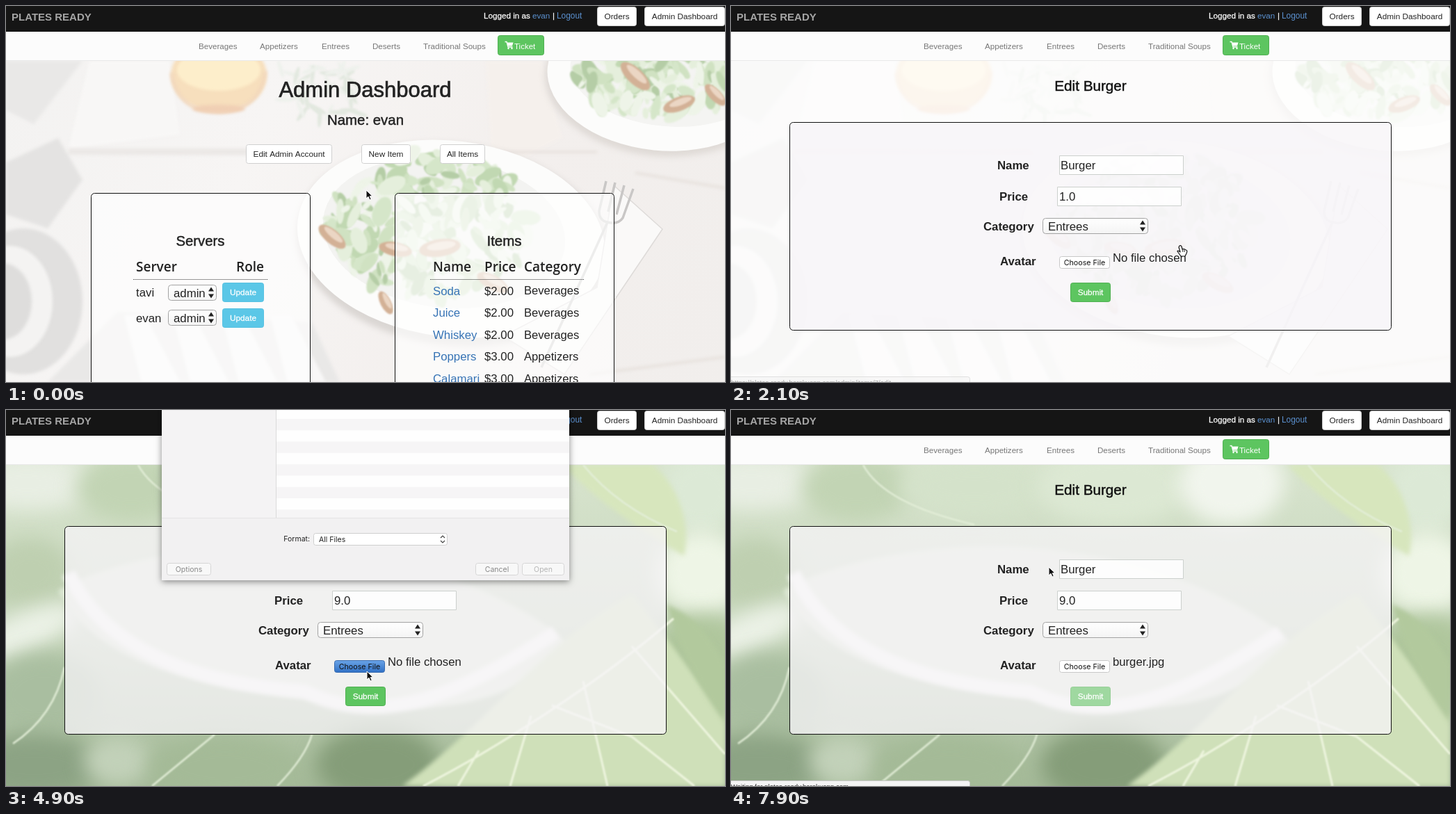
Write an HTML page with a canvas that moves like this. It is 1034 px wide and 541 px high and loops after 8 s.

```html
<!DOCTYPE html>
<html lang="en">
<head>
<meta charset="utf-8">
<title>Admin dashboard</title>
<style>
html, body { margin: 0; width: 100%; height: 100%; overflow: hidden; background: #fff; }
canvas { display: block; }
</style>
</head>
<body>
<canvas id="stage" width="1034" height="541"></canvas>
<script>
const W = 1034, H = 541, LOOP = 8000, STEP = 100;
const stage = document.getElementById('stage').getContext('2d');
let c = stage;

const SANS = '"Liberation Sans", Arial, sans-serif';
const HEAD = '"Open Sans", sans-serif';
const UI = 'Inter, sans-serif';
const INK = '#222', LINK = '#3673b5', GREEN = '#5dc560';

const clamp = v => Math.max(0, Math.min(1, v));
const span = (t, a, b) => clamp((t - a) / (b - a));
const easeOut = p => 1 - (1 - p) ** 2;
const smooth = p => p * p * (3 - 2 * p);
const lerp = (a, b, p) => a + (b - a) * p;

function randomizer(seed) {
  return () => (seed = (seed * 16807) % 2147483647) / 2147483647;
}

// y is the vertical centre of the capitals
function text(s, x, y, size, color = INK, o = {}) {
  c.font = `${o.weight || 400} ${size}px ${o.font || SANS}`;
  c.textAlign = o.align || 'left';
  c.fillStyle = c.strokeStyle = color;
  c.fillText(s, x, y + size * 0.36);
  if (o.medium) {
    c.lineWidth = size * 0.022;
    c.strokeText(s, x, y + size * 0.36);
  }
}

function rect(x, y, w, h, color) {
  c.fillStyle = color;
  c.fillRect(x, y, w, h);
}

function box(x, y, w, h, r, fill, border) {
  c.beginPath();
  c.roundRect(x + 0.5, y + 0.5, w - 1, h - 1, r);
  if (fill) { c.fillStyle = fill; c.fill(); }
  if (border) { c.strokeStyle = border; c.lineWidth = 1; c.stroke(); }
}

function path(points, fill, stroke, width = 1) {
  c.beginPath();
  points.forEach(([x, y]) => c.lineTo(x, y));
  if (fill) { c.closePath(); c.fillStyle = fill; c.fill(); }
  if (stroke) { c.strokeStyle = stroke; c.lineWidth = width; c.stroke(); }
}

function blob(x, y, rx, ry, color, angle = 0) {
  c.beginPath();
  c.ellipse(x, y, rx, ry, angle, 0, 7);
  c.fillStyle = color;
  c.fill();
}

function curve(d, fill, stroke, width) {
  const p = new Path2D(d);
  if (fill) { c.fillStyle = fill; c.fill(p); }
  if (stroke) { c.strokeStyle = stroke; c.lineWidth = width; c.stroke(p); }
}

function gradient(x0, y0, x1, y1, ...colors) {
  const g = c.createLinearGradient(x0, y0, x1, y1);
  colors.forEach((color, i) => g.addColorStop(i / (colors.length - 1), color));
  return g;
}

function blurred(px, draw) {
  c.filter = `blur(${px}px)`;
  draw();
  c.filter = 'none';
}

function layer(draw) {
  const canvas = document.createElement('canvas');
  canvas.width = W;
  canvas.height = H;
  c = canvas.getContext('2d');
  draw();
  c = stage;
  return canvas;
}

function salad(cx, cy, rx, ry, count, seed) {
  const rnd = randomizer(seed);
  const greens = ['#d5e6c9', '#c1d8b2', '#e5efdc', '#b5cda6', '#eef4e8', '#d0e2c2'];
  for (let i = 0; i < count; i++) {
    const a = rnd() * 6.283, d = Math.sqrt(rnd()), size = 7 + rnd() * 15;
    blob(cx + Math.cos(a) * d * rx, cy + Math.sin(a) * d * ry,
      size, size * (0.3 + rnd() * 0.3), greens[Math.floor(rnd() * 6)], rnd() * 3);
  }
}

function shrimp(x, y, size, angle) {
  blob(x, y, size, size * 0.42, '#d3b196', angle);
  blob(x + 2, y - 3, size * 0.7, size * 0.2, '#ebd6c4', angle);
}

const tablePhoto = layer(() => {
  rect(0, 0, W, H, gradient(0, 79, W, H, '#f3f2f1', '#f7f5f4', '#f3efed', '#f1eeec'));
  blurred(2, () => {
    path([[0, 79], [110, 79], [40, 170], [0, 150]], '#e9e8e7');
    path([[120, 79], [235, 79], [250, 185], [90, 205]], '#f8f7f6');
    path([[90, 205], [430, 205], [440, 215], [90, 214]], '#ebe8e6');
    path([[0, 225], [75, 190], [110, 250], [60, 320], [0, 300]], '#e4e3e2');
    blob(25, 425, 85, 105, '#e1e0df');
    blob(5, 425, 62, 80, '#f4f3f2');
    blob(-5, 425, 42, 55, '#dedddc');
    path([[60, 541], [160, 440], [440, 455], [480, 541]], '#e9e8e7');
    for (let i = 0; i < 4; i++)
      path([[170 + i * 70, 445], [200 + i * 70, 445], [250 + i * 70, 541], [195 + i * 70, 541]], '#f8f7f7');
    path([[690, 79], [770, 79], [800, 190], [700, 240]], '#f5f0ec');
    curve('M700 210H850M905 240L1034 262M840 530L1034 505', null, '#e5dfda', 3);

    blob(306, 100, 69, 52, '#f7dfbd');
    blob(306, 92, 60, 30, '#fdeecb');
    curve('M238 96Q246 152 306 153Q366 150 373 94', null, '#f1d6bb', 4);
    blob(306, 148, 38, 6, '#f0cfb4');
  });
  blurred(1.5, () => {
    const rnd = randomizer(31);
    for (let i = 0; i < 45; i++)
      blob(395 + rnd() * 115, 85 + rnd() * 78, 13, 3, i % 2 ? '#e2e8df' : '#eef1ec', rnd() * 3);
  });
  blurred(4, () => {
    blob(940, 110, 166, 106, '#dfdad6', 0.1);
    blob(642, 343, 226, 145, '#dad6d3', 0.12);
  });
  blob(942, 104, 164, 104, '#fcfcfb', 0.1);
  blob(950, 97, 139, 76, '#f4f4f2', 0.1);
  blob(640, 335, 222, 141, '#fcfcfb', 0.12);
  blob(630, 326, 175, 108, '#f3f3f1', 0.12);

  blurred(0.8, () => {
    salad(940, 108, 130, 50, 150, 71);
    shrimp(905, 101, 27, 0.75);
    shrimp(968, 141, 24, -0.35);
    shrimp(1020, 128, 20, 0.8);
    salad(611, 315, 143, 103, 270, 19);
    shrimp(469, 332, 24, 0.7);
    shrimp(546, 427, 18, 1.1);
    shrimp(624, 348, 30, -0.15);
    shrimp(700, 398, 25, 0.5);
    shrimp(560, 350, 24, 0.2);
  });
  path([[874, 258], [944, 321], [803, 530], [715, 475], [850, 405]], '#faf9f8', '#dedbd9', 1.5);
  curve('M863 252L853 295Q853 309 865 311M876 254L866 296M889 258L878 300M902 263L887 305Q880 315 865 311L770 520', null, '#c9c7c6', 3.5);
});

const leafPhoto = layer(() => {
  rect(0, 0, W, H, gradient(0, 79, 0, H, '#d8e4ce', '#c6d6bb', '#a5ba99'));
  blurred(14, () => {
    blob(30, 105, 110, 38, '#e8eee3');
    blob(180, 112, 80, 50, '#c2d4b4');
    blob(350, 110, 110, 42, '#d4e2ca');
    blob(550, 110, 110, 55, '#dce8d3');
    blob(720, 105, 75, 60, '#f1f5ed');
    blob(35, 235, 60, 50, '#becfb0');
    blob(25, 320, 85, 28, '#ebf1e6', -0.4);
    blob(55, 410, 80, 60, '#a9bea0');
    blob(40, 512, 100, 46, '#8ca384');
    blob(160, 505, 48, 35, '#c2d1b9');
    blob(315, 515, 110, 48, '#a4ba97');
    blob(535, 510, 90, 55, '#859d79');
    blob(1000, 120, 60, 60, '#dce9d6');
    blob(1000, 235, 65, 60, '#eef5e6');
    blob(1000, 360, 75, 65, '#afc69c');
  });
  blurred(3, () => {
    curve('M75 260C160 210 340 180 490 205C620 220 770 290 810 340C740 420 620 440 500 425C330 400 145 390 75 260Z', '#dfe9d6');
    curve('M90 235C150 360 300 395 430 405C530 455 640 420 790 320', null, '#f7faf4', 20);
    curve('M800 79C850 130 900 165 975 210C985 170 970 110 930 79Z', '#d7e6bd');
    curve('M570 541C690 455 770 335 900 265C945 320 1010 410 1034 440V541Z', '#cfe0b9');
    curve('M950 280C1000 300 1020 340 1034 365V450C1000 405 970 350 950 280Z', '#b2c99d');
  });
  blurred(1, () => {
    curve('M600 541C700 490 850 395 960 300M680 490L650 541M755 440L725 541M830 390L865 541M900 340L1034 495M785 425L900 470L990 541', null, '#eef5df', 3);
    curve('M830 79Q880 140 965 175M190 79Q220 135 350 165M10 480Q70 440 84 370M210 541L300 467M390 541Q430 500 440 467', null, '#e3eed8', 2.5);
  });
});

const BEVERAGES = 'Beverages', APPETIZERS = 'Appetizers', ENTREES = 'Entrees';
const USER = 'evan';
const HOST = 'plates-ready.herokuapp.com';

function button(label, x, y, w, h = 28, fill = '#fff', border = '#d0d0d0', color = '#222') {
  box(x, y, w, h, 3, fill, border);
  text(label, x + w / 2, y + h / 2, 11.8, color, { align: 'center', medium: color === '#fff' });
}

function select(label, x, y, w) {
  box(x, y, w, 23, 4, gradient(0, y, 0, y + 23, '#fff', '#f4f4f4'), '#a3a3a3');
  text(label, x + 8, y + 11.5, 16.8);
  const ax = x + w - 8, ay = y + 11.5;
  path([[ax - 4, ay - 2], [ax + 4, ay - 2], [ax, ay - 8]], INK);
  path([[ax - 4, ay + 2], [ax + 4, ay + 2], [ax, ay + 8]], INK);
}

function navigation() {
  rect(0, 0, W, 37, '#151515');
  rect(0, 37, W, 41, '#fcfcfc');
  rect(0, 78, W, 1, '#e9e9e9');
  text('PLATES READY', 8, 15.5, 15, '#a5a5a5', { weight: 700 });
  text('Logged in as', 687, 14, 11.7, '#fff', { medium: true });
  text(USER, 757, 14, 11.7, '#5b91d0');
  text('|', 786, 14, 11.7, '#fff', { medium: true });
  text('Logout', 792, 14, 11.9, '#5b91d0');
  button('Orders', 850, 1, 57);
  button('Admin Dashboard', 918, 1, 116);
  const links = { [BEVERAGES]: 277, [APPETIZERS]: 365, [ENTREES]: 454, Deserts: 527, 'Traditional Soups': 600 };
  for (const [label, x] of Object.entries(links)) text(label, x, 57.5, 11.6, '#777');
  box(707, 42, 67, 29, 3, GREEN, '#4fb052');
  curve('M717.5 51.5H720L722 59H728.5', null, '#fff', 1.3);
  path([[720.5, 52.5], [729.5, 52.5], [728, 57.5], [721.5, 57.5]], '#fff');
  blob(722.5, 61, 1.2, 1.2, '#fff');
  blob(727.5, 61, 1.2, 1.2, '#fff');
  text('Ticket', 731, 57.5, 11.5, '#fff');
}

function dotted(x0, x1, y) {
  c.setLineDash([1, 1]);
  path([[x0, y + 0.5], [x1, y + 0.5]], null, '#333');
  c.setLineDash([]);
}

function heading(label, x, y) {
  text(label, x, y, 19, INK, { weight: 600, font: HEAD });
}

const ITEMS = [
  ['Soda', '$2.00', BEVERAGES], ['Juice', '$2.00', BEVERAGES], ['Whiskey', '$2.00', BEVERAGES],
  ['Poppers', '$3.00', APPETIZERS], ['Calamari', '$3.00', APPETIZERS], ['Burger', '$1.00', ENTREES],
  ['Goat', '$3.00', ENTREES]
];

function dashboard(t) {
  const scroll = Math.round(178 * easeOut(span(t, 0, 500)));
  c.drawImage(tablePhoto, 0, 0);
  c.save();
  c.translate(0, -scroll);
  text('Admin Dashboard', 516.5, 120, 31, INK, { align: 'center', medium: true });
  text('Name: ' + USER, 517, 163.5, 20.4, INK, { align: 'center', medium: true });
  button('Edit Admin Account', 345, 199, 124);
  button('New Item', 511, 199, 71);
  button('All Items', 624, 199, 65);
  for (const y of [269, 713])
    for (const x of [122, 559]) box(x, y, 316, 377, 5, 'rgba(255,255,255,.68)', '#111');

  text('Servers', 279.5, 338, 20.3, INK, { align: 'center', medium: true });
  heading('Server', 187, 375);
  heading('Role', 331, 375);
  dotted(183, 376, 393);
  ['tavi', USER].forEach((name, i) => {
    const y = 412 + i * 36.5;
    text(name, 187, y, 16.8);
    select('admin', 233, Math.round(y - 11.5), 70);
    button('Update', 311, Math.round(y - 14), 60, 28, '#5bc7e7', '#57c1e2', '#fff');
  });

  text('Items', 716.5, 338, 20.5, INK, { align: 'center', medium: true });
  heading('Name', 614, 375);
  heading('Price', 688, 375);
  heading('Category', 745, 375);
  dotted(610, 832, 393);
  c.beginPath();
  c.rect(559, 395, 316, 211);
  c.clip();
  ITEMS.forEach(([name, price, category], i) => {
    const y = 409.5 + i * 31.65, shift = name === 'Goat' ? 11 : 0;
    text(name, 614, y, 16.8, LINK);
    text(price, 688, y + shift, 16.8);
    text(category, 745, y + shift, 16.6);
  });
  c.restore();

  c.globalAlpha = t < 100 ? 0 : 1 - span(t, 900, 1200);
  box(1030, scroll * 0.52 - 4, 5, 282, 2, '#858585');
  c.globalAlpha = 1;
  navigation();
}

function editForm(t) {
  rect(0, 0, W, H, '#fff');
  if (t < 2300) {
    c.globalAlpha = 0.25;
    c.drawImage(tablePhoto, 0, 0);
    c.globalAlpha = 1;
  } else {
    c.drawImage(leafPhoto, 0, 0);
  }
  navigation();
  text('Edit Burger', 517, 115, 20.7, '#111', { align: 'center', medium: true });
  box(84, 167, 866, 300, 5, 'rgba(247,244,248,.75)', '#111');

  const labels = { Name: [383, 229], Price: [386, 274], Category: [363, 316.5], Avatar: [387, 367] };
  for (const [label, [x, y]] of Object.entries(labels)) text(label, x, y, 16.8, INK, { weight: 700 });
  box(472, 215, 179, 28, 0, 'rgba(255,255,255,.85)', '#ccd0cd');
  text('Burger', 474, 229, 16.8);
  box(469, 260, 179, 28, 0, 'rgba(255,255,255,.85)', '#ccd0cd');
  if (t >= 3400 && t < 3900) rect(472, 264, 10, 20, '#b4d5fe');
  text(t < 3900 ? '1.0' : '9.0', 472, 274, 16.8);
  if (t >= 2800 && t < 4200) {
    box(635, 267, 9, 14, 4, '#f4f4f4', '#ddd');
    path([[638, 272.5], [642, 272.5], [640, 269.5]], '#555');
    path([[638, 275.5], [642, 275.5], [640, 278.5]], '#555');
  }
  select(ENTREES, 448, 305, 152);

  const pressed = t >= 4600 && t < 5200;
  box(472, 360, 73, 18, 3, pressed ? gradient(0, 360, 0, 378, '#6ba5e8', '#2f6fc4') : '#fff', pressed ? '#3a6cb0' : '#c8c8c8');
  text('Choose File', 508.5, 369, 10.7, '#111', { font: UI, align: 'center' });
  text(t < 6200 ? 'No file chosen' : 'burger.jpg', 549, 362, 16.7);
  const sent = t >= 7000;
  button('Submit', 488, 398, 58, 28, sent ? '#9fd8a0' : GREEN, sent ? '#98cf99' : '#4fb052', '#fff');
}

function status(label, alpha, color) {
  c.globalAlpha = alpha;
  box(-3, 533, 347, 20, 3, '#f4f4f4', '#c8c8c8');
  text(label, 0, 541.5, 9.6, color);
  c.globalAlpha = 1;
}

const PLACES = ['Remote Drive', 'Workspace HD', 'studio', 'Applications', 'Desktop',
  'Documents', 'Music', 'Pictures', 'Movies', 'Downloads', 'Games'];
const ICONS = [
  'M-4 4H5Q8 3 6 0Q4-5-1-4Q-5-4-5-1Q-8 2-4 4Z',
  'M-5-6H5L6 6H-6ZM-6 2H6',
  'M-7-4H-2L-1-2H7V5H-7Z',
  'M-6 6L1-6L6 6M-7 2H7',
  'M-7-5H7V5H-7ZM-5 2H5',
  'M-4-6H3L6-3V4H-4ZM-6-3V6H3',
  'M-3 4V-5L5-6V3M-3 4Q-5 3-6 5Q-5 7-3 4M5 3Q3 2 2 4Q3 6 5 3',
  'M-7-3H-3L-2-5H2L3-3H7V5H-7ZM-3 1A3 3 0 1 0 3 1A3 3 0 1 0-3 1',
  'M-6-6H6V6H-6ZM-3-6V6M3-6V6',
  'M0-4V3M-3 0L0 4L3 0',
  'M-7-4H-2L-1-2H7V5H-7Z'
];

const FILES = [
  ['burger.jpg', '4:12 PM', '259 KB', 'JPEG', '#8a6348'],
  ['app_tour.gif', '4:03 PM', '3.9 MB', 'GIF', '#cfcfcf'],
  ['french_fry.png', '4:00 PM', '1 MB', 'PNG', '#b77c63'],
  ['check', '3:58 PM', '28.6 MB', 'QT movie', '#444'],
  ['Assorted', '10/18/16', '--', 'Folder', '#62b7e6']
];

function ui(s, x, y, color = INK, align) {
  text(s, x, y, 10.5, color, { font: UI, align });
}

function sidebar() {
  ui('Favorites', 231, -0.5, '#777');
  rect(224, 94, 164, 20, '#dce3dc');
  PLACES.forEach((name, i) => {
    const y = 18 + i * 21.65;
    c.save();
    c.translate(246, y);
    if (name === 'Downloads') blob(0, 0, 7, 7, '#606060');
    curve(ICONS[i], name === 'Desktop' ? '#888' : null, name === 'Downloads' ? '#fff' : '#606060', 1.3);
    c.restore();
    text(name, 259, y, 10.5, INK, { font: UI, weight: name === 'Desktop' ? 500 : 400 });
  });
}

function fileList() {
  FILES.forEach(([name, time, size, kind, color], i) => {
    const y = 15.5 + i * 16.3, chosen = i === 0;
    if (chosen) rect(389, 8, 421, 15, '#226fd6');
    if (kind === 'Folder') {
      path([[396, y - 4], [396, y + 4], [403, y]], '#777');
      box(410, y - 5, 14, 11, 1, color);
      rect(411, y - 6, 5, 2, color);
    } else {
      box(411, y - 4, 12, 8, 0, color, '#ddd');
    }
    const muted = chosen ? '#fff' : '#858585';
    ui(name, 429, y, chosen ? '#fff' : INK);
    ui(time, 564, y, muted);
    ui(size, 741, y, muted, 'right');
    ui(kind, 762, y, muted);
  });
}

function fileSheet(t) {
  const shown = easeOut(span(t, 4700, 5100)) * (1 - smooth(span(t, 6000, 6300)));
  if (shown <= 0) return;
  const loaded = t >= 5300;
  c.save();
  c.translate(0, Math.round((shown - 1) * 306));
  c.shadowColor = 'rgba(0,0,0,.45)';
  c.shadowBlur = 9;
  c.shadowOffsetY = 2;
  rect(224, -100, 586, 421, '#f2f1f2');
  c.shadowColor = 'transparent';

  c.save();
  c.beginPath();
  c.rect(224, -100, 586, 331);
  c.clip();
  rect(224, -100, 164, 331, '#f4f3f4');
  rect(389, -100, 421, 331, '#fefefe');
  for (let y = 23.7; y < 231; y += 32.6) rect(389, y, 421, 16.3, '#f6f5f6');
  rect(388, -100, 1, 331, '#dadada');
  if (loaded) {
    sidebar();
    fileList();
  }
  c.restore();
  rect(224, 231, 586, 1, '#e4e4e4');

  ui('Format:', 437, 261.5, INK, 'right');
  box(442, 253, 193, 18, 3, '#fff', '#cfcfcf');
  ui('All Files', 450, 262);
  if (loaded) box(621, 253, 14, 18, 3, gradient(0, 253, 0, 271, '#6fb0f5', '#2673e0'));
  c.lineJoin = 'miter';
  curve('M625 260L628 257L631 260M625 264L628 267L631 264', null, loaded ? '#fff' : '#444', 1.2);
  const buttons = [['Options', 231, 64], ['Cancel', 675, 62], ['Open', 742, 61]];
  for (const [label, x, w] of buttons) {
    box(x, 296, w, 18, 3, loaded ? '#f6f5f6' : '#f8f8f8', loaded ? '#efeeef' : '#d6d6d6');
    const color = loaded ? (label === 'Open' ? '#111' : '#666') : (label === 'Open' ? '#b5b5b5' : '#888');
    ui(label, x + w / 2, 305, color, 'center');
  }
  c.restore();
}

// time, x, y of the pointer's hot spot
const POINTER = [
  [0, 518, 265], [900, 518, 265], [1400, 641, 388], [1900, 643, 386], [2100, 646, 346],
  [2800, 480, 275], [4100, 482, 277], [4500, 519, 376], [5200, 519, 376], [5800, 428, 51],
  [5950, 440, 17], [6300, 440, 17], [6800, 516, 408], [7200, 516, 408], [7900, 457, 226], [8000, 455, 222]
];

function pointer(t) {
  const i = Math.max(1, POINTER.findIndex(k => k[0] > t));
  const [t0, x0, y0] = POINTER[i - 1], [t1, x1, y1] = POINTER[i];
  const p = smooth(span(t, t0, t1));
  c.save();
  c.translate(Math.round(lerp(x0, x1, p)), Math.round(lerp(y0, y1, p)));
  c.lineJoin = 'round';
  if (t >= 1300 && t < 2400) {
    curve('M-1-1Q1-2 2 0L3 4Q6 3 8 5Q11 5 9 10L7 14H1L-4 7Q-4 5 0 8L-2 1Z', '#fff', '#111', 1.2);
    curve('M3 4L4 8M5.5 4.5L6.5 8', null, '#111', 0.9);
  } else if (t >= 2700 && t < 4200) {
    curve('M-3-7Q0-7 0-5Q0-7 3-7M0-5V6M-3 8Q0 8 0 6Q0 8 3 8M-2 3H2', null, '#222', 1.3);
  } else {
    curve('M0 0V12L3 9.3L5 14L7.2 13L5.2 8.7H9Z', '#111', '#fff', 1);
  }
  c.restore();
}

function draw(t) {
  if (t < 1900) dashboard(t);
  else editForm(t);
  fileSheet(t);
  if (t >= 1300 && t < 2300)
    status(`https://${HOST}/admin/items/7/edit`, 1 - 0.75 * span(t, 1900, 2200), '#555');
  if (t >= 7000) status(`Waiting for ${HOST}`, 1, '#333');
  pointer(t);
}

function tick() {
  const t = performance.now() % LOOP;
  draw(Math.floor(t / STEP) * STEP);
  requestAnimationFrame(tick);
}
tick();
</script>
</body>
</html>
```
